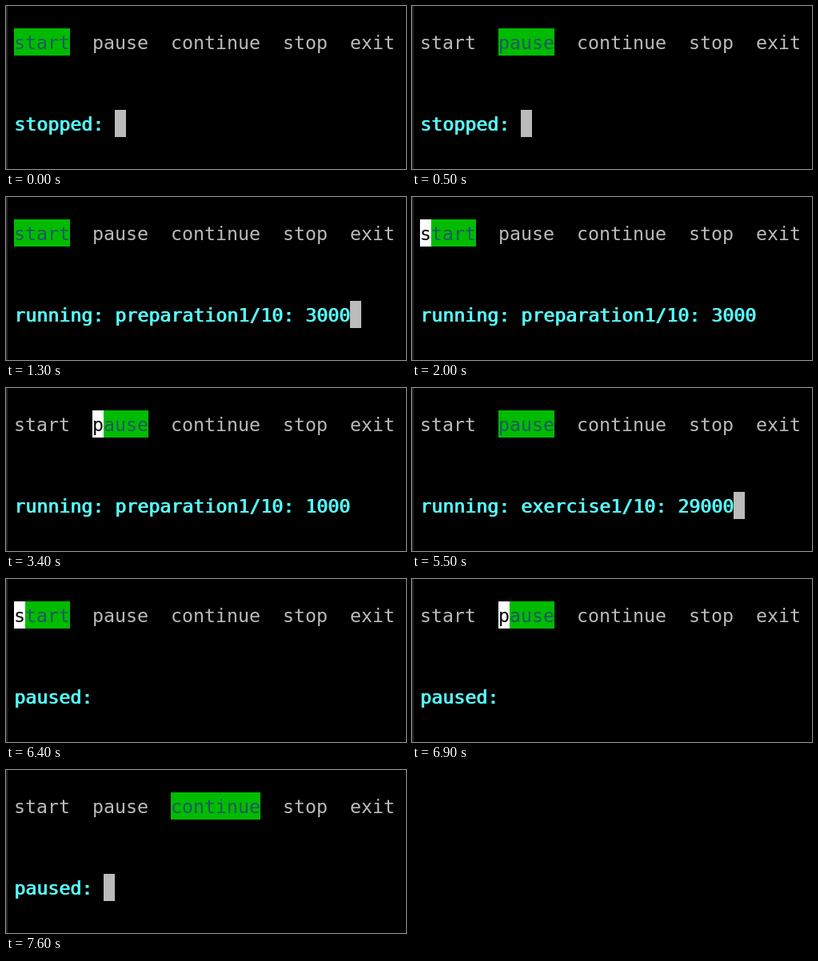
These frames come from a looping animation (500 px wide and 204 px high, 8 s). An HTML page with a canvas:

```html
<!DOCTYPE html>
<html>
<head>
<meta charset="utf-8">
<style>
html, body { margin: 0; width: 100%; height: 100%; overflow: hidden; background: #000; }
canvas { display: block; }
</style>
</head>
<body>
<canvas id="stage" width="500" height="204"></canvas>
<script>
const ctx = document.getElementById('stage').getContext('2d');
const LOOP = 8000;
const CELL_W = 14, CELL_H = 34, LEFT = 10;
const MENU_Y = 28, STATUS_Y = 130, BASELINE = 26;
const GREY = '#bbbbbb', GREEN = '#00bb00', TEAL = '#1f5a60', CYAN = '#55ffff';
const ITEMS = ['start', 'pause', 'continue', 'stop', 'exit'];
const PREP = 'running: preparation1/10: ';
const WORK = 'running: exercise1/10: ';

// Each state: start time, selected item, cursor on the menu, status line.
const STATES = [
  [0, 0, false, 'stopped: '],
  [100, 1, false, 'stopped: '],
  [900, 0, true, 'stopped: '],
  [1300, 0, false, PREP + '3000'],
  [1400, 0, true, PREP + '3000'],
  [2400, 0, false, PREP + '2000'],
  [3400, 1, true, PREP + '1000'],
  [4400, 1, false, WORK + '30000'],
  [5400, 1, false, WORK + '29000'],
  [6400, 0, true, 'paused: '],
  [6800, 1, true, 'paused: '],
  [7000, 2, true, 'paused: '],
  [7400, 2, false, 'paused: ']
];

const columnX = col => LEFT + col * CELL_W;

function fillCells(col, y, count, color) {
  ctx.fillStyle = color;
  ctx.fillRect(columnX(col), y, count * CELL_W, CELL_H);
}

function write(text, col, y, color, bold = false) {
  ctx.fillStyle = color;
  [...text].forEach((ch, i) => {
    const x = columnX(col + i);
    ctx.fillText(ch, x, y + BASELINE);
    if (bold) ctx.fillText(ch, x + 1, y + BASELINE);
  });
}

function drawMenu(selected, cursorOnMenu) {
  let col = 0;
  ITEMS.forEach((item, i) => {
    const active = i === selected;
    if (active) fillCells(col, MENU_Y, item.length, GREEN);
    write(item, col, MENU_Y, active ? TEAL : GREY);
    if (active && cursorOnMenu) {
      fillCells(col, MENU_Y, 1, '#ffffff');
      write(item[0], col, MENU_Y, '#000000');
    }
    col += item.length + 2;
  });
}

function draw(time) {
  const [, selected, cursorOnMenu, status] = STATES.findLast(s => s[0] <= time);
  ctx.fillStyle = '#000';
  ctx.fillRect(0, 0, 500, 204);
  ctx.fillStyle = '#262626';
  ctx.fillRect(0, 0, 2, 204);
  ctx.font = '23.25px "DejaVu Sans Mono", monospace';
  drawMenu(selected, cursorOnMenu);
  write(status, 0, STATUS_Y, CYAN, true);
  if (!cursorOnMenu) fillCells(status.length, STATUS_Y, 1, GREY);
}

const origin = performance.now();
function tick() {
  draw((performance.now() - origin) % LOOP);
  requestAnimationFrame(tick);
}
tick();
</script>
</body>
</html>
```
